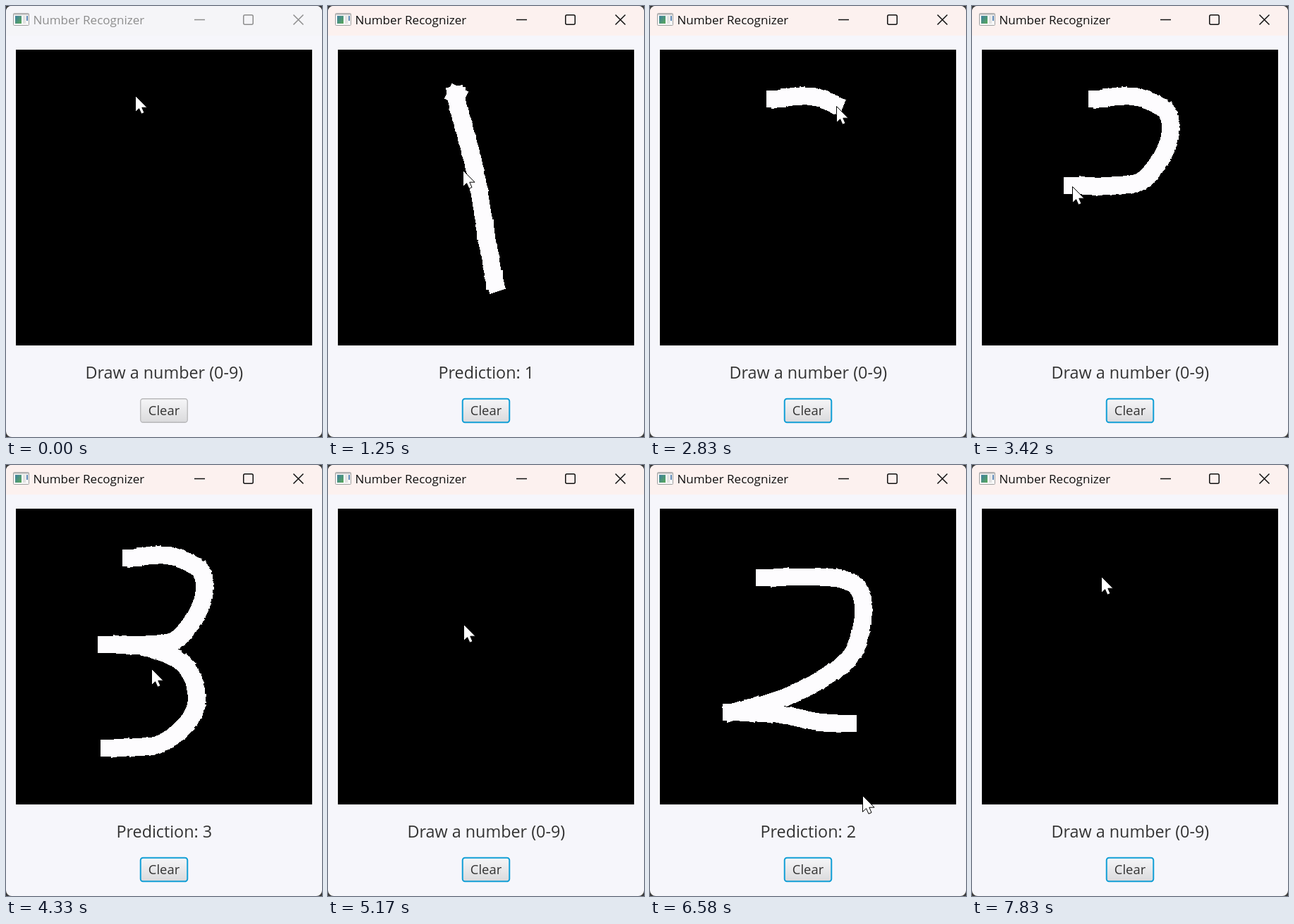
An HTML page that plays this animation: 448 by 612 pixels, repeating every 8000 ms.

```html
<!DOCTYPE html>
<html lang="en">
<head>
<meta charset="utf-8">
<title>Number Recognizer</title>
<style>
  html, body { margin: 0; width: 100%; height: 100%; overflow: hidden; background: #3a3a3a; }
  svg { display: block; width: 448px; height: 612px; }
  text { font-family: "Open Sans", "Noto Sans", sans-serif; }
</style>
</head>
<body>
<svg viewBox="0 0 448 612" xmlns="http://www.w3.org/2000/svg">
  <defs>
    <linearGradient id="face" x1="0" y1="0" x2="0" y2="1">
      <stop offset="0" stop-color="#f6f6f8"/>
      <stop offset="1" stop-color="#dadadc"/>
    </linearGradient>
    <linearGradient id="pane" x1="0" y1="0" x2="1" y2="1">
      <stop offset="0" stop-color="#3f7fa0"/>
      <stop offset="1" stop-color="#58a858"/>
    </linearGradient>
  </defs>
  <rect width="448" height="612" rx="8" fill="#f6f6fb"/>
  <path id="bar" d="M0 42V8a8 8 0 0 1 8-8h432a8 8 0 0 1 8 8v34z"/>

  <rect x="10.5" y="10.5" width="22" height="17" rx="1" fill="#f8f8f8" stroke="#a0a0a0"/>
  <rect x="11" y="11" width="21" height="2" fill="#c8c8c8"/>
  <rect x="13" y="14" width="9" height="11" fill="url(#pane)"/>
  <rect x="24" y="14" width="4" height="11" fill="#e2e2e2"/>
  <rect x="29" y="14" width="2" height="7" fill="#5c86b4"/>

  <text id="title" x="38.4" y="26" font-size="17.07">Number Recognizer</text>
  <g id="controls" fill="none" stroke-width="1.5">
    <path d="M267 19.5h15"/>
    <rect x="336.75" y="12.75" width="13.5" height="13.5" rx="2"/>
    <path d="M407.5 12.5l14 14m0-14l-14 14"/>
  </g>

  <rect x="14" y="62" width="420" height="420" fill="#000"/>
  <path id="ink" fill="none" stroke="#fdfcfe" stroke-width="24" stroke-linecap="square" shape-rendering="crispEdges"/>
  <text id="label" x="224.3" y="529" font-size="23.35" text-anchor="middle" fill="#333"></text>
  <rect id="button" x="190.75" y="557.75" width="66.5" height="33.5" rx="3.5"/>
  <text x="224" y="581" font-size="18.4" text-anchor="middle" fill="#333">Clear</text>
  <path id="cursor" d="M.5 .5V23.5L5.6 18.7L9 26.3L13 24.5L9.8 17.2H17Z" fill="#fff" stroke="#000"/>
</svg>
<script>
const LOOP = 8000, FPS = 12, STEP = 6;
const $ = id => document.getElementById(id);
const parse = s => s.split(' ').map(p => p.split(',').map(Number));
const lerp = (a, b, u) => a + (b - a) * u;

// Each round: pen strokes, then cursor stops (time,x,y) on the way to Clear and beyond
const rounds = [
  { guess: 1, shown: 920, press: 2170, clear: 2250,
    pens: [pen(170, 900, '183,127 183,137 208,232 226,335 237,394')],
    stops: parse('1250,191,232 1420,175,131 1750,236,473 2080,227,575 2250,227,575 2500,177,132') },
  { guess: 3, shown: 4080, press: 4660, clear: 4750,
    pens: [
      pen(2600, 3420, '177,132 222,128 262,140 280,162 275,202 243,246 200,255 142,255'),
      pen(3420, 4050, '142,255 200,259 256,288 268,346 222,394 146,402')
    ],
    stops: parse('4250,200,202 4600,228,577 4750,228,577 5170,192,225') },
  { guess: 2, shown: 6420, press: 7000, clear: 7080,
    pens: [
      pen(5290, 5950, '162,160 245,159 284,167 300,188 300,228 278,279 205,324 134,347 115,351'),
      pen(5950, 6330, '115,351 182,354 240,365 281,367')
    ],
    stops: parse('6420,292,298 6580,301,468 6900,227,576 7080,227,576 7580,194,192 7830,183,157 8000,183,157') }
];

// Whole cursor journey in order of time
const track = [[0, 183, 126], ...rounds.flatMap(r => [
  ...r.pens.flatMap(p => p.dots.map((d, i) => [lerp(p.from, p.to, i / (p.dots.length - 1)), ...d])),
  ...r.stops
])];

// Smooth curve through a few points, sampled at whole pixels like a mouse
function pen(from, to, s) {
  const pts = parse(s), dots = [pts[0]];
  for (let i = 1; i < pts.length; i++) {
    const a = pts[i - 1], b = pts[i], before = pts[i - 2] || a, after = pts[i + 1] || b;
    const n = Math.ceil(Math.hypot(b[0] - a[0], b[1] - a[1]) / STEP);
    const spline = (k, u) => a[k] + u / 2 * (b[k] - before[k]
      + u * (2 * before[k] - 5 * a[k] + 4 * b[k] - after[k]
      + u * (3 * (a[k] - b[k]) + after[k] - before[k])));
    for (let j = 1; j <= n; j++) dots.push([0, 1].map(k => Math.round(spline(k, j / n))));
  }
  return { from, to, dots };
}

// Every mouse move adds its own square-capped line
function inkOf({ from, to, dots }, t) {
  if (t < from) return '';
  const last = Math.round(Math.min(1, (t - from) / (to - from)) * (dots.length - 1));
  let d = `M${dots[0]}h.01`;
  for (let i = 1; i <= last; i++) d += `M${dots[i - 1]}L${dots[i]}`;
  return d;
}

function cursorAt(t) {
  const i = track.findIndex(key => key[0] > t);
  const [t0, x0, y0] = track[i - 1], [t1, x1, y1] = track[i];
  const u = (t - t0) / (t1 - t0);
  return [lerp(x0, x1, u), lerp(y0, y1, u)].map(Math.round);
}

// Start time of the current screen update, in whole hundredths of a second
function tick(ms) {
  const at = k => Math.round(k * 100 / FPS) * 10;
  const k = Math.floor(ms * FPS / 1000);
  return at(k + 1) <= ms ? at(k + 1) : at(k) <= ms ? at(k) : at(k - 1);
}

function draw(ms) {
  const t = tick(ms), active = t >= 170;
  const [x, y] = cursorAt(t);
  const round = rounds.find(r => t < r.clear);
  const pressed = round && t >= round.press;
  const hover = x > 190 && x < 258 && y > 557 && y < 592;
  const tone = active ? '#111' : '#8e8e8e';

  $('ink').setAttribute('d', round ? round.pens.map(p => inkOf(p, t)).join('') : '');
  $('label').textContent = round && t >= round.shown ? `Prediction: ${round.guess}` : 'Draw a number (0-9)';
  $('cursor').setAttribute('transform', `translate(${x} ${y + 1})`);
  $('bar').setAttribute('fill', active ? '#fcf1ef' : '#f5f5f8');
  $('title').setAttribute('fill', tone);
  $('controls').setAttribute('stroke', tone);
  $('button').setAttribute('fill', pressed ? '#dadadc' : hover ? '#eeeef0' : 'url(#face)');
  $('button').setAttribute('stroke', active ? '#129fd6' : '#b8b8ba');
  $('button').setAttribute('stroke-width', active ? 2 : 1.3);
}

const start = performance.now();
function loop() {
  draw((performance.now() - start) % LOOP);
  requestAnimationFrame(loop);
}
loop();
</script>
</body>
</html>
```
